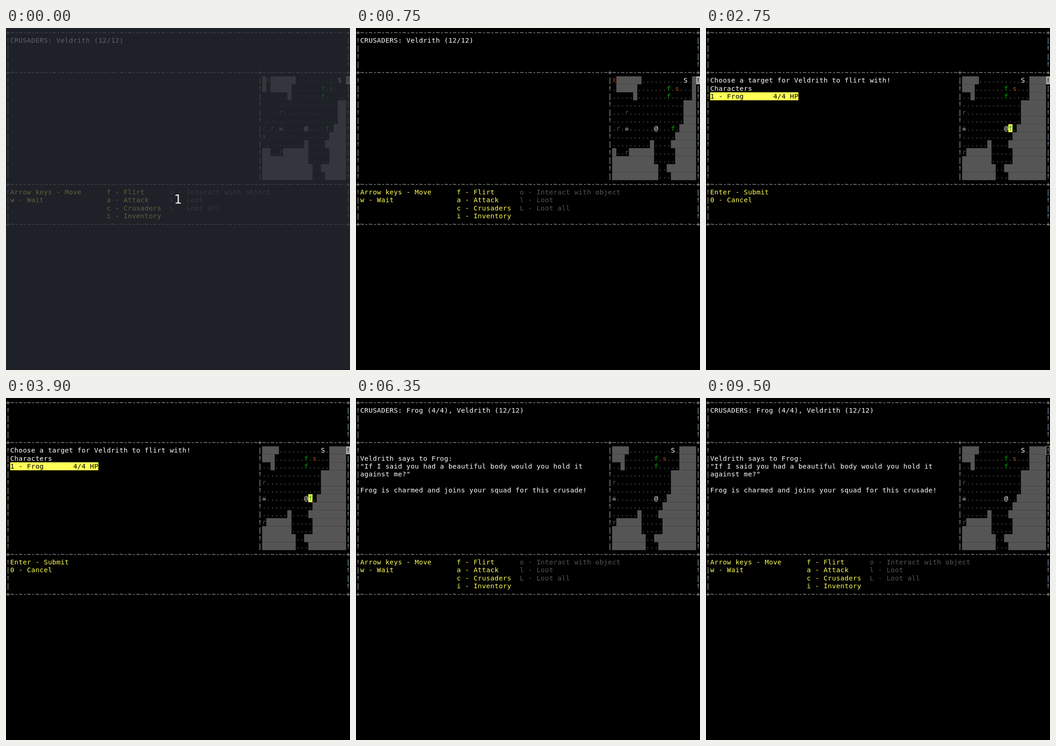
Recreate the animation shown at these times as an HTML page with a canvas. Size 751x746 px, loop 9.65 s.

```html
<!DOCTYPE html>
<html lang="en">
<head>
<meta charset="utf-8">
<title>Terminal crusade</title>
<style>
html, body { margin: 0; width: 100%; height: 100%; overflow: hidden; background: #000; }
canvas { display: block; }
</style>
</head>
<body>
<canvas id="stage" width="751" height="746"></canvas>
<script>
const ctx = document.getElementById('stage').getContext('2d');
const LOOP = 9650;
const SCALE = 11 / 12;
const CW = 10 * SCALE, RH = 19 * SCALE, TOP = 0.9;
const FONT = 16 * SCALE + 'px "DejaVu Sans Mono", monospace';
const WHITE = '#fff', GREY = '#aaa', DIM = '#555', YELLOW = '#ffff55';
const MAP_COL = 61, MAP_ROW = 6, MAP_W = 20, HERO_COL = 10, HERO_ROW = 6;
const HERO = 'Veldrith';

// # wall, k skull; the hero is drawn separately and stays centred
const MAP = [
  '#X######..........S.',
  '#.#####.......f.s...',
  '......#.......f.....',
  '..................##',
  '....r.............##',
  '..................##',
  'r.r.k..........f.###',
  'x...............####',
  '..........#....#####',
  '##..r######.....####',
  '###########.....####',
  '############..######',
  '############...#####'
];
const INK = { X: '#a5300f', S: WHITE, f: '#00aa00', s: '#b0560c', k: '#ddd', x: '#95489c' };
const BAR_INK = { 0: '#aaa49a', 60: '#90b0a5', 81: '#90b3c5' };

const MOVES = [750, 950, 1150, 1350];
const BLINKS = [350, 650, 1850, 2450, 3300, 3900, 4500, 4600, 5150, 5750,
  6350, 7000, 7550, 8200, 8800, 9400];
const MEET = 1350, CHOOSE = 2750, JOIN = 4650, BLUR = 9500;

const passed = (times, t) => times.filter(at => t >= at).length;

function fillCells(col, row, n, color) {
  ctx.fillStyle = color;
  ctx.fillRect(col * CW, TOP + row * RH, n * CW, RH);
}

function print(col, row, text, color = WHITE) {
  ctx.fillStyle = color;
  [...text].forEach((ch, i) => {
    if (ch !== ' ') ctx.fillText(ch, (col + i) * CW, TOP + row * RH + 15 * SCALE);
  });
}

function bars(col, first, last, flip) {
  for (let row = first; row <= last; row++) {
    print(col, row, (row - first + flip) % 2 ? '|' : '!', BAR_INK[col]);
  }
}

function drawFrame() {
  const rule = '+' + '~-'.repeat(40) + '+';
  for (const row of [0, 19, 24]) print(0, row, rule, GREY);
  print(0, 5, rule.slice(0, 60) + '+' + rule.slice(61), GREY);
  for (const [first, last] of [[1, 4], [20, 23]]) {
    bars(0, first, last, 0);
    bars(81, first, last, 1);
  }
  bars(0, 6, 18, 0);
  bars(60, 6, 18, 1);
  bars(81, 6, 18, 0);
}

function drawMap(shift, choosing, joined) {
  MAP.forEach((line, y) => {
    const row = MAP_ROW + y;
    const view = line.slice(shift).padEnd(MAP_W, '#');
    for (const run of view.matchAll(/#+/g)) {
      fillCells(MAP_COL + run.index, row, run[0].length, DIM);
    }
    [...view].forEach((ch, x) => {
      if (ch === '#') return;
      const col = MAP_COL + x;
      const frog = y === HERO_ROW && ch === 'f';
      if (y === HERO_ROW && x === HERO_COL) return print(col, row, '@');
      if (frog && joined) ch = '.';
      if (frog && choosing) fillCells(col, row, 1, YELLOW);
      print(col, row, ch === 'k' ? '\u2620' : ch, INK[ch] || DIM);
    });
  });
}

function drawMenu() {
  ['Arrow keys - Move', 'w - Wait'].forEach((s, i) => print(1, 20 + i, s, YELLOW));
  ['f - Flirt', 'a - Attack', 'c - Crusaders', 'i - Inventory']
    .forEach((s, i) => print(24, 20 + i, s, YELLOW));
  ['o - Interact with object', 'l - Loot', 'L - Loot all']
    .forEach((s, i) => print(39, 20 + i, s, DIM));
}

function drawChoice() {
  print(1, 6, `Choose a target for ${HERO} to flirt with!`);
  print(1, 7, 'Characters');
  fillCells(1, 8, 21, YELLOW);
  print(1, 8, '1 - Frog'.padEnd(15) + '4/4 HP', '#000');
  print(1, 20, 'Enter - Submit', YELLOW);
  print(1, 21, '0 - Cancel', YELLOW);
}

function drawText(t) {
  if (t >= CHOOSE && t < JOIN) return drawChoice();
  drawMenu();
  const squad = t >= JOIN ? 'Frog (4/4), ' : '';
  print(1, 1, `CRUSADERS: ${squad}${HERO} (12/12)`);
  if (t >= JOIN) {
    print(1, 7, `${HERO} says to Frog:`);
    print(1, 8, '"If I said you had a beautiful body would you hold it');
    print(1, 9, 'against me?"');
    print(1, 11, 'Frog is charmed and joins your squad for this crusade!');
  } else if (t >= MEET) {
    print(1, 6, 'Characters: Frog [E] (4/4 HP)');
  }
}

function drawCursor(t) {
  if (t >= BLUR) {
    ctx.strokeStyle = GREY;
    ctx.lineWidth = 1;
    ctx.strokeRect(742.5, 104.9, 8, 18.2);
  } else if (passed(BLINKS, t) % 2 === 0) {
    fillCells(81, 6, 1, GREY);
    print(81, 6, '!', '#000');
  }
}

function drawCountdown() {
  ctx.fillStyle = 'rgba(40, 44, 53, 0.75)';
  ctx.fillRect(0, 0, 751, 746);
  ctx.fillStyle = '#261a20';
  ctx.fillRect(0, 744.5, 751, 1.5);
  ctx.fillStyle = '#eee';
  ctx.font = '27px "DejaVu Sans", sans-serif';
  ctx.textAlign = 'center';
  ctx.fillText('1', 375.5, 383);
  ctx.textAlign = 'left';
}

function draw(t) {
  ctx.fillStyle = '#000';
  ctx.fillRect(0, 0, 751, 746);
  ctx.font = FONT;
  drawFrame();
  drawMap(passed(MOVES, t), t >= CHOOSE && t < JOIN, t >= JOIN);
  drawText(t);
  drawCursor(t);
  if (t < 50) drawCountdown();
}

const start = performance.now();
function tick() {
  draw((performance.now() - start) % LOOP);
  requestAnimationFrame(tick);
}
tick();
</script>
</body>
</html>
```
